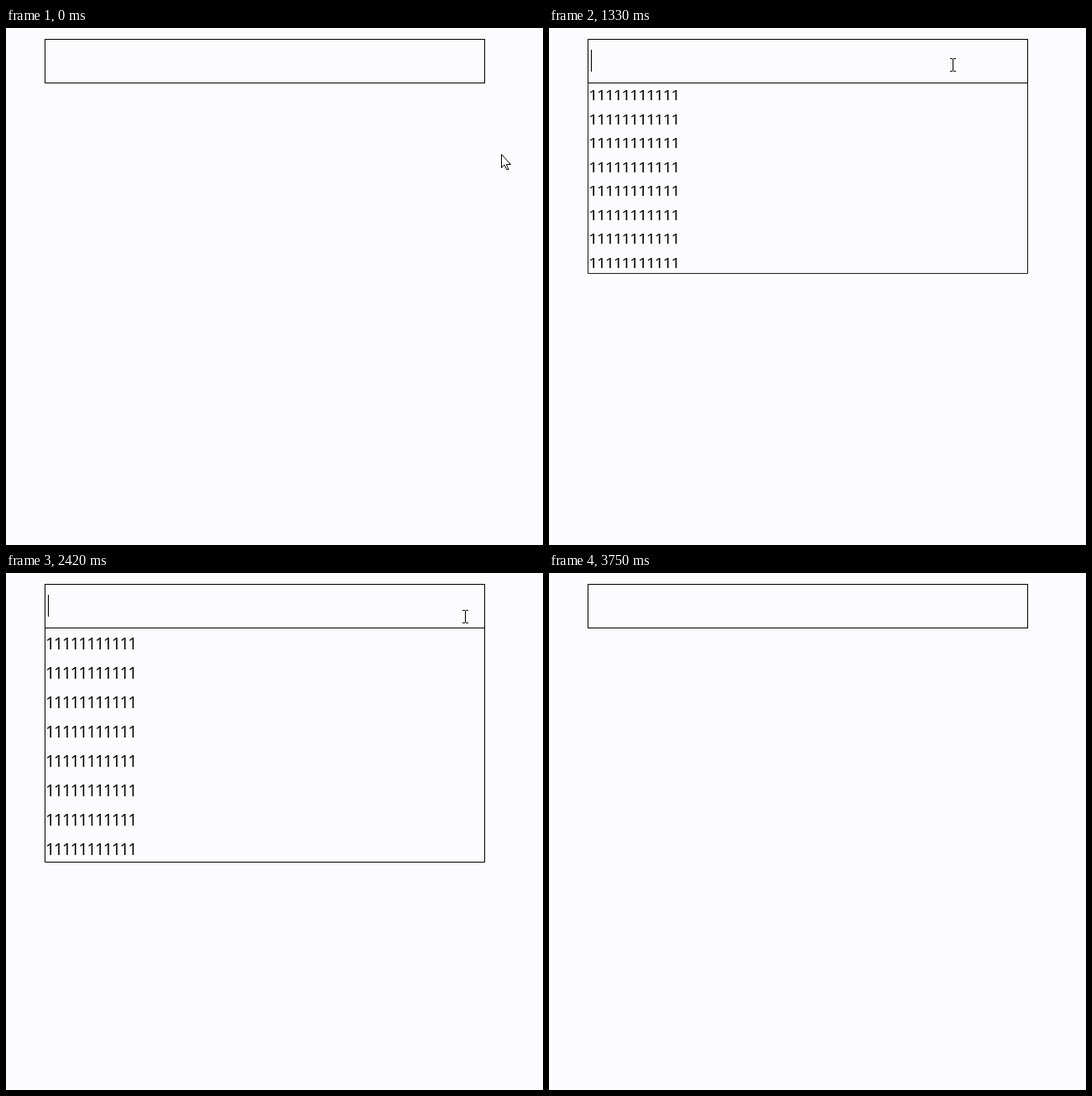
Animation, 640 px wide and 616 px high, one loop 4.58 s. Source, as an HTML page:

```html
<!DOCTYPE html>
<html lang="en">
<head>
<meta charset="utf-8">
<title>Dropdown</title>
<style>
  html, body { margin: 0; width: 100%; height: 100%; overflow: hidden; background: #fcfcfe; }
  svg { display: block; }
  path, rect { fill: none; stroke: #000; }
  #arrow { fill: #fff; }
  text { font: 20px "Open Sans", "Noto Sans", sans-serif; letter-spacing: -1.6px; }
</style>
</head>
<body>
<svg width="640" height="616" viewBox="0 0 640 616">
  <g id="list"><path d="M46.5 0V279.5H570.5V0"/></g>
  <rect x="46.5" y="13.5" width="524" height="52"/>
  <path id="caret" d="M50.5 26V52"/>
  <path id="beam" d="M-3 -7.5h3m1 0h3M.5 -7V7M-3 7.5h3m1 0h3"/>
  <path id="arrow" d="M.5 .5v16l3.5-3.5 2.5 5.5h2.5l-2.7-6h5.2z"/>
</svg>
<script>
const LOOP = 4580, STEP = 1000 / 12, SLIDE = 960;
const OPEN = 842, CLOSE = 2667, BLINK = 530;
const $ = id => document.getElementById(id);
const list = $('list'), caret = $('caret'), beam = $('beam'), arrow = $('arrow');

for (let row = 0; row < 8; row++) {
  const line = document.createElementNS(list.namespaceURI, 'text');
  line.setAttribute('x', 47);
  line.setAttribute('y', 26 + row * 35);
  line.textContent = '1'.repeat(11);
  list.append(line);
}

// Pointer path: time, x, y
const path = [
  [250, 590, 150], [770, 481, 44], [2100, 481, 44], [2640, 594, 57], [2750, 595, 57],
  [3083, 599, 67], [3250, 617, 120], [3420, 618, 250], [3670, 606, 467]
];

// The CSS "ease" curve, solved by bisection
function ease(x) {
  if (x <= 0) return 0;
  if (x >= 1) return 1;
  const bezier = (a, b, s) => 3 * (1 - s) ** 2 * s * a + 3 * (1 - s) * s * s * b + s ** 3;
  let lo = 0, hi = 1;
  for (let i = 0; i < 20; i++) {
    const mid = (lo + hi) / 2;
    if (bezier(.25, .25, mid) < x) lo = mid; else hi = mid;
  }
  return bezier(.1, 1, lo);
}

function pointerAt(t) {
  const next = path.findIndex(p => p[0] > t);
  if (next === 0) return path[0].slice(1);
  if (next < 0) return path[path.length - 1].slice(1);
  const [t0, x0, y0] = path[next - 1], [t1, x1, y1] = path[next];
  const k = (t - t0) / (t1 - t0);
  return [Math.round(x0 + (x1 - x0) * k), Math.round(y0 + (y1 - y0) * k)];
}

const show = (el, on) => el.style.display = on ? '' : 'none';

function draw(t) {
  const scale = ease((t - OPEN) / SLIDE) - ease((t - CLOSE) / SLIDE);
  show(list, scale > .002);
  list.setAttribute('transform', `translate(0 65) scale(1 ${scale})`);

  const focused = t >= 830 && t < CLOSE;
  show(caret, focused && Math.floor((t - 830) / BLINK) % 2 === 0);

  const [x, y] = pointerAt(t);
  const inField = x > 46 && x < 571 && y > 13 && y < 66;
  const visible = t < 3710;
  show(beam, visible && inField);
  show(arrow, visible && !inField);
  for (const el of [beam, arrow]) el.setAttribute('transform', `translate(${x} ${y})`);
}

const start = performance.now();
function tick() {
  const t = (performance.now() - start) % LOOP;
  draw(Math.floor((t + 4) / STEP) * STEP);
  requestAnimationFrame(tick);
}
tick();
</script>
</body>
</html>
```
